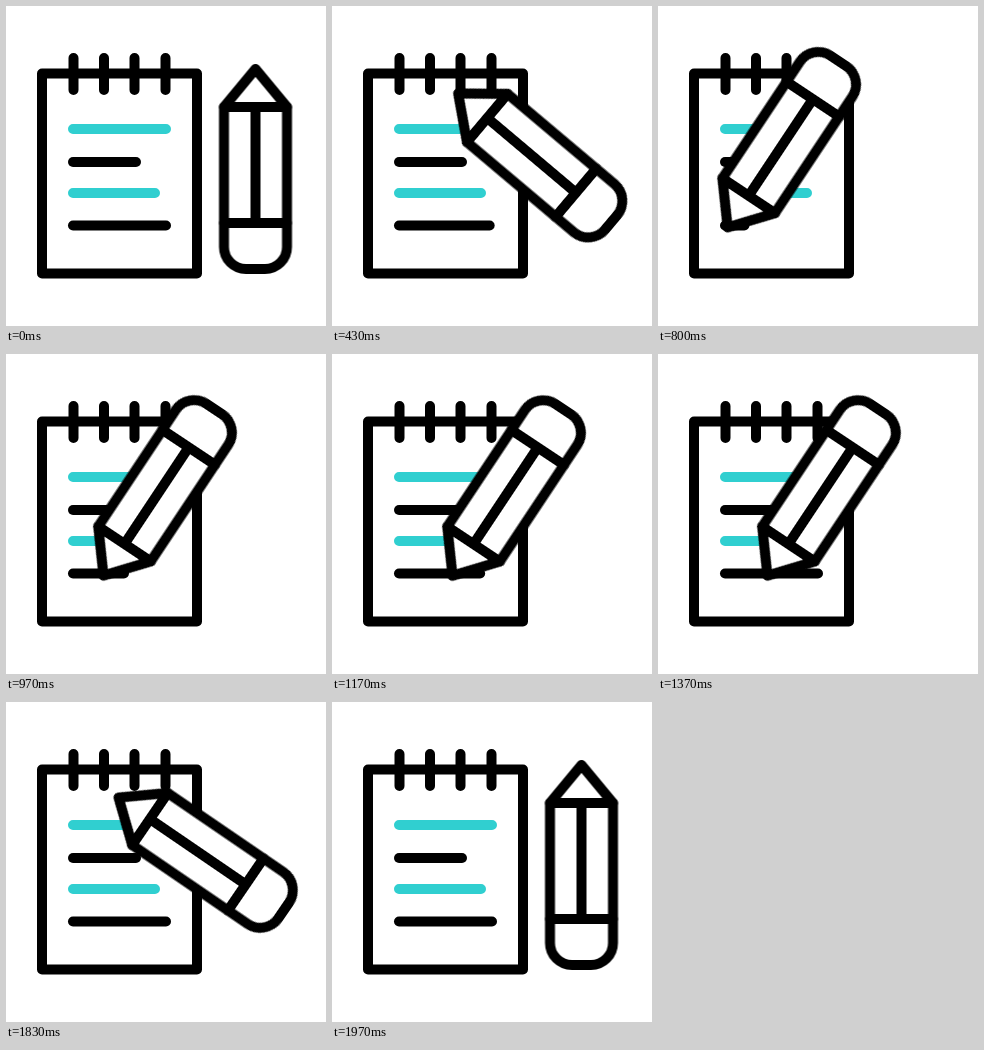
Animation, 320 px wide and 320 px high, one loop 2500 ms. Source, as an HTML page without scripts:

```html
<!DOCTYPE html>
<html lang="en">
<head>
<meta charset="utf-8">
<title>Notepad and pencil</title>
<style>
  html, body { margin: 0; width: 100%; height: 100%; overflow: hidden; background: #fff; }
  svg { display: block; width: 100vw; height: 100vh; }
  .ink { fill: none; stroke: #000; stroke-width: 10; stroke-linecap: round; stroke-linejoin: round; }
  .teal { stroke: #30cfd0; }
  .body { fill: #fff; }

  .pencil { animation: pencil 2.5s linear infinite; }
  .written { stroke-dasharray: 93 200; animation: write 2.5s linear infinite; }

  /* swing in, write to the right, slide back, swing out */
  @keyframes pencil {
    0%, 12% { transform: translate(249.5px, 163px) rotate(0deg); }
    17.2% { transform: translate(203px, 152px) rotate(-49.5deg); }
    25.2% { transform: translate(131px, 139px) rotate(-121.3deg); }
    28% {
      transform: translate(106px, 138px) rotate(-146.4deg);
      animation-timing-function: cubic-bezier(.33, .5, .67, .93);
    }
    52% { transform: translate(183px, 138.5px) rotate(-146.4deg); }
    64% { transform: translate(106px, 138px) rotate(-146.4deg); }
    66.8% { transform: translate(131px, 139px) rotate(-121.3deg); }
    78.7%, 100% { transform: translate(249.5px, 163px) rotate(0deg); }
  }

  /* the last line shrinks away, then is written again */
  @keyframes write {
    0% { stroke-dashoffset: 0; }
    12% { stroke-dashoffset: 0; animation-timing-function: cubic-bezier(.4, 0, .7, 0); }
    28% { stroke-dashoffset: 92.9; animation-timing-function: cubic-bezier(.33, .4, .67, .87); }
    52%, 100% { stroke-dashoffset: 0; }
  }
</style>
</head>
<body>
<svg viewBox="0 0 320 320">
  <g class="ink">
    <rect x="36" y="67.5" width="155" height="200"/>
    <path d="M67.5 52v32M98 52v32M128.5 52v32M159.5 52v32"/>
    <path class="teal" d="M67 123h93M67 187h82"/>
    <path d="M67 156h63"/>
    <path class="written" d="M67 219.5h93"/>
  </g>
  <g class="ink pencil">
    <path class="body" d="M-31.5 -62L0 -100L31.5 -62V78A22 22 0 0 1 9.5 100H-9.5A22 22 0 0 1 -31.5 78Z"/>
    <path d="M-31.5 -62h63M-31.5 54h63M0 -62V54"/>
  </g>
</svg>
</body>
</html>
```
